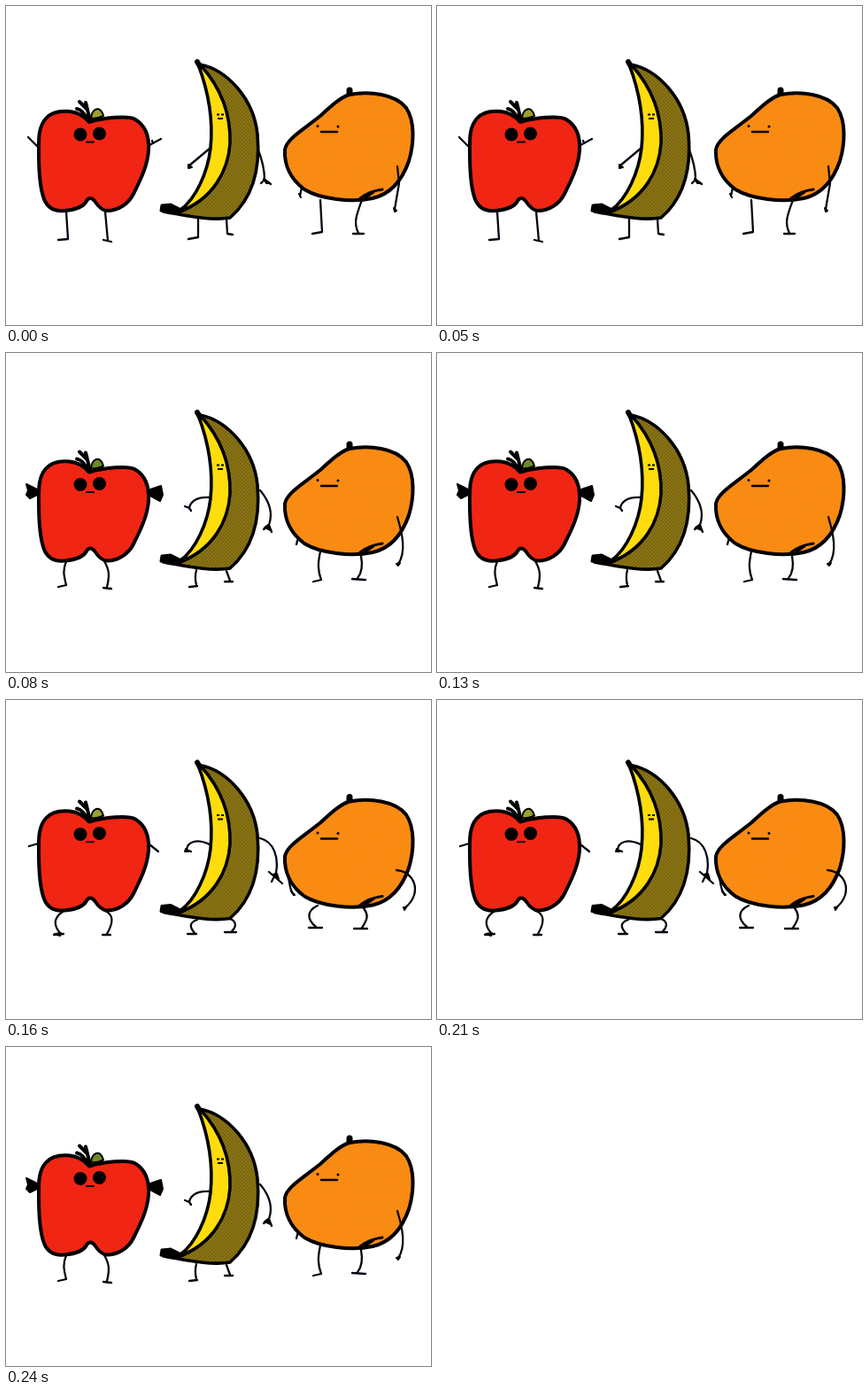
Animation of 480x360 px, one loop 0.32 s. Source, as an HTML page:

```html
<!DOCTYPE html>
<html lang="en">
<head>
<meta charset="utf-8">
<title>Dancing fruit</title>
<style>
  html, body { margin: 0; width: 100%; height: 100%; overflow: hidden; background: #fff; }
  svg { display: block; width: 100%; height: 100%; }
  .line { fill: none; stroke: #000; stroke-linecap: round; stroke-linejoin: round; }
  .body { stroke-width: 4; }
  .limb { stroke: #000812; stroke-width: 2.3; }
</style>
</head>
<body>
<svg viewBox="0 0 480 360">
  <defs>
    <pattern id="olive" width="4" height="4" patternUnits="userSpaceOnUse">
      <rect width="4" height="4" fill="#8b7514"/>
      <path d="M0 0h2v2H0zM2 2h2v2H2z" fill="#7a6611"/>
    </pattern>
    <pattern id="orange" width="4" height="4" patternUnits="userSpaceOnUse">
      <rect width="4" height="4" fill="#ff8e12"/>
      <path d="M0 0h2v2H0zM2 2h2v2H2z" fill="#f58813"/>
    </pattern>
    <pattern id="shade" width="4" height="4" patternUnits="userSpaceOnUse">
      <rect width="4" height="4" fill="#8a1d0c"/>
      <path d="M0 0h2v2H0zM2 2h2v2H2z" fill="#551408"/>
    </pattern>
  </defs>

  <g id="apple">
    <path id="skin" fill="#f12513" d="M94 131C88 124 82 120 72 119C60 118 50 121 45 127C36 137 37 152 37 165C37 185 38 205 43 218C47 228 55 232 66 231C78 230 88 226 91 220C93 216 97 216 100 220C104 226 108 231 114 231C126 231 138 224 144 212C152 196 160 180 161 163C162 146 156 134 146 128C138 123 110 126 94 131Z"/>
    <path fill="url(#shade)" d="M56 121C43 135 42 150 43 170C43 194 45 214 54 230Q45 228 42 218C37 202 37 180 37 160C37 140 41 125 56 121Z"/>
    <use href="#skin" class="line body" style="fill:none"/>
    <path id="leaf" class="line" stroke-width="2" d="M96 127C96 116 107 111 110 124Q104 127 96 127Z"/>
    <path class="line" stroke-width="4" d="M83 108L92 117L95 130M90 109L92 117M80 116Q87 117 93 130"/>
    <circle cx="84" cy="145" r="7.5"/><circle cx="105.500" cy="144" r="7.500"/>
    <path class="line" stroke-width="2" d="M91 153.500h8"/>
  </g>

  <g id="banana">
    <path fill="#ffdc0c" d="M217 68C230 100 234 130 231 160C228 188 214 218 198 231C235 218 251 185 253 155C254 125 245 95 222 70Z"/>
    <path fill="url(#olive)" d="M220 66C250 72 280 105 284 145C288 190 275 220 253 239C235 242 215 239 192 233C235 218 251 185 253 155C254 125 245 95 220 66Z"/>
    <path class="line" stroke-width="3.600" d="M217 66C230 100 234 130 231 160C228 188 214 218 197 230M220 67C245 95 254 125 253 155C251 185 235 218 194 233M219 66C250 72 280 105 284 145C288 190 275 220 253 239C235 242 215 239 178 232"/>
    <path class="line" stroke-width="6" d="M216 63L219 68"/>
    <path class="line" style="fill:#000" stroke-width="3" d="M175 231L176 225L186 224L200 231L190 233Z"/>
    <path class="line" stroke-width="2" style="stroke-linecap:butt" d="M238 122.500h3M243 122.500h3M239 127h6"/>
  </g>

  <g id="mango">
    <path class="line body" style="fill:url(#orange)" d="M388 100C410 96 440 99 452 115C462 130 461 155 455 175C448 195 436 212 414 217C390 222 355 218 337 207C322 196 314 180 315 162C317 150 335 140 355 124C368 112 378 103 388 100Z"/>
    <path class="line" stroke-width="7" d="M388 95v3"/>
    <path class="line" stroke-width="3" d="M400 217Q410 209 425 207M406 216L415 210"/>
    <circle cx="352" cy="135.500" r="1.500"/><circle cx="375" cy="136" r="1.500"/>
    <path class="line" stroke-width="2.400" d="M356 142h18"/>
  </g>

  <path id="limbs" class="line limb"/>
  <path id="hands" class="line" style="fill:#000" stroke-width="2"/>
</svg>
<script>
const get = id => document.getElementById(id);

// Each pose: how far the bodies drop, the limb strokes and the solid hands.
const poses = [
  {
    drop: { apple: 0, banana: 0, mango: 0 }, leaf: '#9da02f',
    limbs: `M35 158L25 148M30 153L27 150M162 157L175 150M166 155L165 152
      M68 232L70 263L59 264M112 232L115 265M110 264L119 266
      M231 160L207 180M284 160C290 175 292 185 292 196L288 200M292 196L299 201
      M217 240L217 261L206 263M249 240L250 257L256 258
      M334 205L332 214M442 181L444 200L439 229
      M355 219L357 255L346 257M402 219C396 235 392 245 398 256M392 257L404 257`,
    hands: 'M206 179L210 182L206 183ZM291 195L294 200L298 200ZM331 212L333 216ZM438 228L441 231L439 232Z'
  },
  {
    drop: { apple: 3.5, banana: 4, mango: 8 }, leaf: '#6d8b25',
    limbs: `M68 235C64 245 65 250 68 262L59 264M111 235C117 245 117 252 114 264M110 265L119 266
      M230 163C215 162 208 168 207 175L202 173M207 175L209 178
      M287 155C298 168 302 180 297 194L291 199M297 194L300 202
      M215 245C213 252 214 258 215 262M207 264L216 263M249 246L253 257M247 258L256 258
      M330 208L328 216M442 185C448 205 452 225 443 238
      M355 224C352 238 352 245 356 256L347 258M401 229C403 240 402 248 397 254M391 255L406 256`,
    hands: 'M35 154L23 148L25 155L23 160L27 164L35 160ZM163 154L175 150L177 160L174 167L163 161ZM292 197L296 194L299 200ZM441 238L445 237L443 240Z'
  },
  {
    drop: { apple: 6.5, banana: 7.5, mango: 14.5 }, leaf: '#98a030',
    limbs: `M36 162L26 165M162 163L172 171
      M67 237C55 244 52 252 61 263M54 265L65 264M112 238C121 242 122 250 114 264M109 265L118 265
      M230 163C215 156 205 160 204 169L209 171
      M287 156C303 160 308 178 305 195L300 205M297 194L312 207
      M216 248C207 251 207 256 213 263M205 264L215 264M253 247C261 250 260 256 255 261M247 262L260 262
      M319 201C321 208 320 214 325 220M441 192C455 193 465 205 461 220Q458 229 450 235
      M352 232C339 238 340 248 350 256M342 257L357 257M404 235C410 243 408 248 402 257M393 258L408 258`,
    hands: 'M203 168L206 171L202 171ZM301 197L306 196L308 202ZM322 216L326 220ZM449 234L452 234L450 237ZM55 264L62 263L61 266Z'
  }
];
const order = [0, 1, 2, 1];
const stepMs = 80;

function draw(time) {
  const pose = poses[order[Math.floor(time / stepMs) % order.length]];
  for (const [fruit, y] of Object.entries(pose.drop)) {
    get(fruit).setAttribute('transform', `translate(0 ${y})`);
  }
  get('leaf').style.fill = pose.leaf;
  get('limbs').setAttribute('d', pose.limbs);
  get('hands').setAttribute('d', pose.hands);
}

const start = performance.now();
function tick() {
  draw(performance.now() - start);
  requestAnimationFrame(tick);
}
tick();
</script>
</body>
</html>
```
